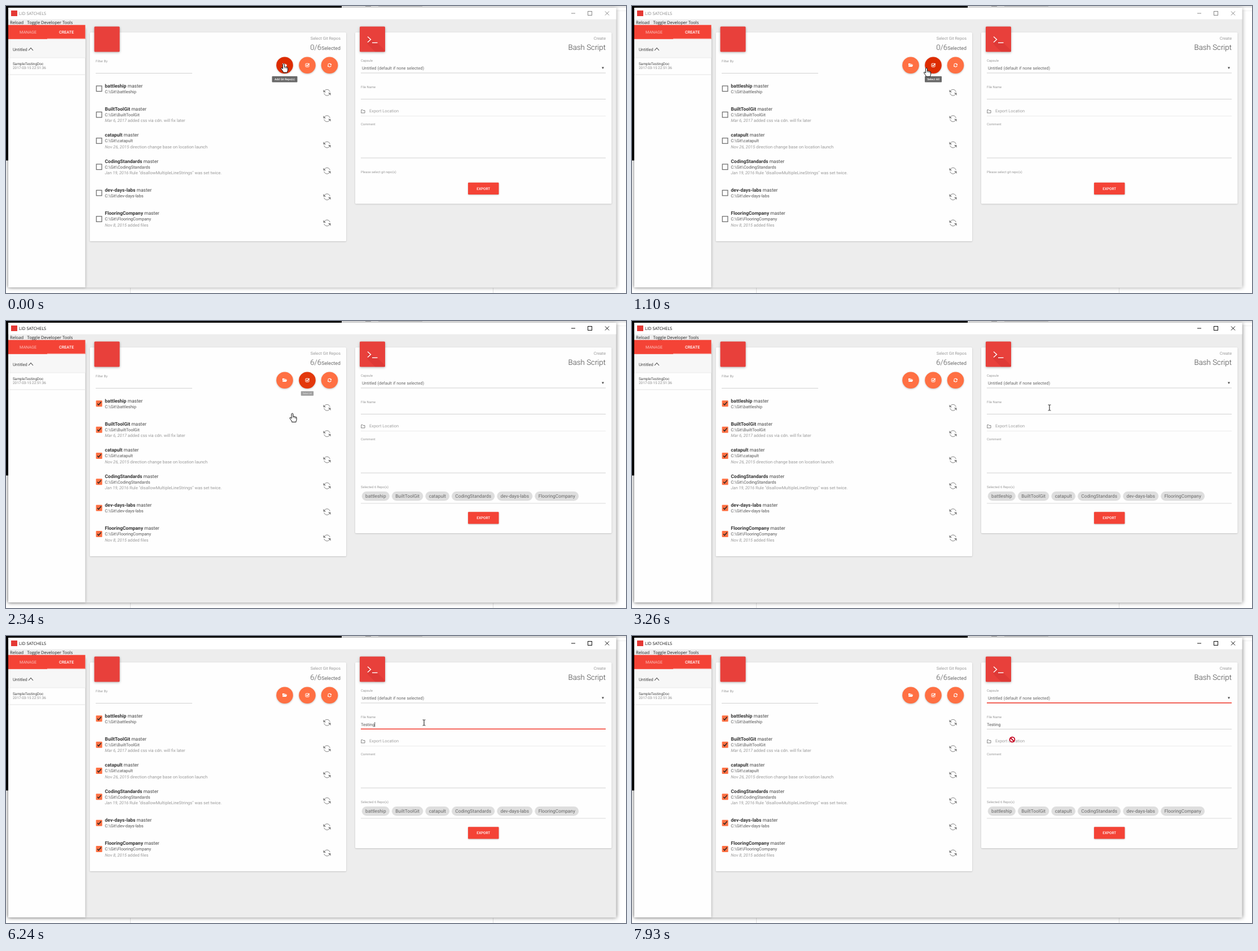
These frames come from a looping animation (1099 by 510 pixels, 8 s). An HTML page with a canvas:

```html
<!DOCTYPE html>
<html lang="en">
<head>
<meta charset="utf-8">
<title>Repository bundle tool</title>
<style>
html, body { margin: 0; width: 100%; height: 100%; overflow: hidden; background: #fff; }
canvas { display: block; width: 1099px; height: 510px; }
</style>
</head>
<body>
<canvas id="stage" width="1099" height="510"></canvas>
<script>
const LOOP = 8000;
const RED = '#f44336', ORANGE = '#ff7043';
const ROBOTO = 'Roboto, sans-serif', SYSTEM = '"Open Sans", sans-serif';
const ctx = document.getElementById('stage').getContext('2d');

const repos = [
  { name: 'battleship' },
  { name: 'BuiltToolGit', date: 'Mar 6, 2017', note: ' added css via cdn. will fix later' },
  { name: 'catapult', date: 'Nov 26, 2015', note: ' direction change base on location launch' },
  { name: 'CodingStandards', date: 'Jan 19, 2016', note: ' Rule "disallowMultipleLineStrings" was set twice.' },
  { name: 'dev-days-labs' },
  { name: 'FlooringCompany', date: 'Nov 8, 2015', note: ' added files' }
];

// time, x, y, pointer kind; each pose holds until the next
const pointerPath = [
  [0, 492, 102.5, 'hand'], [150, 491.5, 102, 'hand'], [310, 492, 103, 'hand'],
  [610, 500, 104, 'hand'], [770, 510, 107, 'arrow'], [930, 519, 110, 'hand'], [1100, 522, 110, 'hand'],
  [1390, 524, 109.5, 'hand'], [1540, 525, 110, 'hand'],
  [2010, 524, 113, 'hand'], [2170, 516, 139, 'hand'], [2340, 507.5, 164, 'hand'],
  [2490, 540, 184, 'hand'], [2640, 588, 201, 'hand'], [2790, 634, 207, 'arrow'],
  [2940, 684, 192, 'arrow'], [3100, 725, 161, 'beam'], [3260, 740, 154, 'beam'],
  [5740, 741, 159, 'beam'], [5900, 742, 172, 'arrow'], [6050, 742, 168, 'arrow'],
  [6210, 741, 154, 'beam'], [6370, 739, 132, 'arrow'], [6530, 736, 113, 'arrow'], [6680, 734, 106.5, 'arrow'],
  [7620, 721, 128, 'arrow'], [7780, 695, 158, 'beam'], [7930, 674, 184, 'denied']
];
const typing = [[0, ''], [4800, 'Tes'], [4960, 'Test'], [5120, 'Testin'], [5280, 'Testing']];

const handShape = new Path2D('M-1.4 1Q0 -1 1.4 1V5.5Q2.7 4.6 3.7 6Q5 5.2 5.8 6.6Q7.6 6.2 7.6 8V11.5Q7.2 13 6.6 14.2V15.6H-.8V14.2Q-3 11 -4.4 9Q-4.6 7 -3 7.4L-1.4 9.2Z');
const arrowShape = new Path2D('M0 0V10.5L2.4 8.3L4.1 12.2L5.8 11.5L4.1 7.7H7.4Z');

const heldAt = (list, t) => list.filter(k => k[0] <= t).pop();
const clamp01 = v => Math.max(0, Math.min(1, v));
const ramp = (t, from, to) => clamp01((t - from) / (to - from));

function rect(x, y, w, h, fill) {
  ctx.fillStyle = fill;
  ctx.fillRect(x, y, w, h);
}

function line(points, color, width = 1) {
  ctx.beginPath();
  points.forEach(([x, y]) => ctx.lineTo(x, y));
  ctx.strokeStyle = color;
  ctx.lineWidth = width;
  ctx.stroke();
}

function round(x, y, w, h, r, fill) {
  ctx.beginPath();
  ctx.roundRect(x, y, w, h, r);
  ctx.fillStyle = fill;
  ctx.fill();
}

function disc(x, y, r, fill) {
  ctx.beginPath();
  ctx.arc(x, y, r, 0, 7);
  ctx.fillStyle = fill;
  ctx.fill();
}

function shadowed(alpha, blur, dy, draw) {
  ctx.save();
  ctx.shadowColor = `rgba(0,0,0,${alpha})`;
  ctx.shadowBlur = blur;
  ctx.shadowOffsetY = dy;
  draw();
  ctx.restore();
}

// y is the middle of the capitals; returns the x where the text ends
function text(str, x, y, size, color, { style = '', align = 'left', family = ROBOTO } = {}) {
  ctx.font = `${style} ${size}px ${family}`;
  ctx.textAlign = align;
  ctx.fillStyle = color;
  ctx.fillText(str, x, y + size * 0.355);
  return x + ctx.measureText(str).width;
}

// direction 1 turns clockwise, -1 counter-clockwise
function cycleArrows(x, y, r, color, width, direction) {
  ctx.save();
  ctx.translate(x, y);
  ctx.scale(direction, 1);
  for (let i = 0; i < 2; i++) {
    ctx.beginPath();
    ctx.arc(0, 0, r, Math.PI * 1.08, Math.PI * 1.85);
    ctx.strokeStyle = color;
    ctx.lineWidth = width;
    ctx.stroke();
    ctx.beginPath();
    ctx.moveTo(r * 1.2, -r * 0.95);
    ctx.lineTo(r * 1.2, -r * 0.1);
    ctx.lineTo(r * 0.35, -r * 0.1);
    ctx.fillStyle = color;
    ctx.fill();
    ctx.rotate(Math.PI);
  }
  ctx.restore();
}

function drawDesktop() {
  rect(0, 0, 1099, 510, '#fff');
  rect(0, 0, 595, 4, '#000');
  rect(0, 0, 4, 274.5, '#000');
  rect(595, 0, 504, 3, '#e8e8e8');
  rect(637, 0, 10, 1, '#999');
  rect(660, 0, 78, 1, '#bbb');
  rect(1082, 8, 17, 1, '#f0f0f0');
  rect(220, 501, 1, 9, '#e2e2e2');
  rect(863, 501, 1, 9, '#e2e2e2');
}

function drawWindow(focused) {
  shadowed(focused ? 0.5 : 0.38, 7, 1, () => rect(4, 3, 1077.5, 497.3, '#ededed'));
  rect(4, 3, 1077.5, 20.5, '#fff');
  rect(9, 8, 11, 10, '#e53935');
  const ink = focused ? '#111' : '#888';
  text('LID SATCHELS', 23, 13, 7.5, ink, { family: SYSTEM });
  line([[1002, 13], [1009, 13]], ink);
  ctx.strokeRect(1031.5, 9.5, 7, 7);
  line([[1062, 9.5], [1069, 16.5]], ink);
  line([[1069, 9.5], [1062, 16.5]], ink);
  text('Reload', 7, 29.5, 7.55, '#222', { family: SYSTEM });
  text('Toggle Developer Tools', 37.5, 29.5, 7.55, '#222', { family: SYSTEM });
}

function drawSidebar() {
  shadowed(0.28, 4, 0, () => rect(4, 40, 136.5, 460, '#fefefe'));
  rect(4, 33.7, 136.5, 25.2, RED);
  rect(73, 57.7, 67.5, 1.2, '#f9b9b3');
  text('MANAGE', 24, 46, 7.25, '#fbc0bb');
  text('CREATE', 94, 46, 7.25, '#fff', { style: '500' });
  rect(4, 58.9, 136.5, 33, '#f7f7f7');
  rect(4, 91.5, 136.5, 1, '#ebebeb');
  rect(4, 121.5, 136.5, 1, '#e4e4e4');
  text('Untitled', 12, 77, 7.5, '#444');
  line([[40, 79], [44, 74.5], [48, 79]], '#444', 1.1);
  text('SampleTestingDoc', 12, 103, 6.5, '#444');
  text('2017-03-15 22:51:36', 12, 110, 6.45, '#888');
}

function card(x, bottom) {
  shadowed(0.2, 2.5, 0.7, () => round(x, 47, 454.5, bottom - 47, 1.5, '#fefefe'));
}

function tile(x) {
  shadowed(0.28, 4, 1.2, () => round(x, 36.5, 45, 45, 1.5, '#e8403b'));
}

function terminalTile(x) {
  tile(x);
  ctx.save();
  ctx.beginPath();
  ctx.rect(x, 36.5, 45, 45);
  ctx.clip();
  ctx.beginPath();
  [[14, 17], [20, 23], [32, 29], [48, 45], [48, 60], [43, 60], [14, 31]].forEach(([a, b]) => ctx.lineTo(x + a, 37 + b));
  ctx.fillStyle = 'rgba(170,20,25,.16)';
  ctx.fill();
  ctx.restore();
  line([[x + 14, 54.5], [x + 19.5, 59.5], [x + 14, 64.5]], '#fff', 1.4);
  line([[x + 22, 65.3], [x + 31.5, 65.3]], '#fff', 1.4);
}

function mixHover(amount) {
  const a = [255, 112, 67], b = [221, 44, 0];
  return `rgb(${a.map((v, i) => Math.round(v + (b[i] - v) * amount))})`;
}

function roundButton(x, hover) {
  shadowed(0.24, 3, 1, () => disc(x, 105.2, 14.8, mixHover(hover)));
}

function folderIcon(x, y) {
  ctx.beginPath();
  [[-4, 3], [-4, -3], [-1, -3], [0, -2], [2.6, -2], [2.6, -0.6], [4.3, -0.6], [2.7, 3]].forEach(([a, b]) => ctx.lineTo(x + a, y + b));
  ctx.fillStyle = '#fff';
  ctx.fill();
  line([[x - 3.6, y + 2.2], [x - 2.2, y - 0.6], [x + 2.6, y - 0.6]], ORANGE, 0.6);
}

function drawButtons(t) {
  const addHover = t < 770 ? 1 : 0;
  const allHover = t < 930 ? 0 : t < 2170 ? 1 : 1 - ramp(t, 2240, 2790);
  roundButton(494, addHover);
  roundButton(534, allHover);
  roundButton(573.5, 0);
  folderIcon(494, 105);
  ctx.beginPath();
  ctx.roundRect(531, 102.2, 6, 6, 1);
  ctx.strokeStyle = '#fff';
  ctx.lineWidth = 1;
  ctx.stroke();
  line([[532.3, 104.6], [533.8, 106.2], [537.8, 102.2]], '#fff', 1.3);
  cycleArrows(573.5, 105.2, 2.9, '#fff', 1.2, 1);
}

function tooltip(str, x, width, alpha, scale) {
  if (alpha <= 0) return;
  ctx.save();
  ctx.globalAlpha = alpha;
  ctx.translate(x, 124.7);
  ctx.scale(scale, scale);
  round(-width / 2, 0, width, 10.7, 1, '#686868');
  text(str, 0, 5.2, 5.1, '#fff', { style: '500', align: 'center' });
  ctx.restore();
}

function drawTooltips(t) {
  tooltip('Add Git Repo(s)', 494, 45, t < 770 ? 1 : t < 930 ? 0.5 : 0, 1);
  const shown = t < 930 ? 0 : t < 1100 ? 0.6 : 1;
  const leaving = ramp(t, 2170, 2640);
  tooltip('Select All', 534, 30, shown * (1 - leaving), 1 - 0.7 * leaving);
}

function checkBox(x, y, checked) {
  if (checked) {
    round(x - 5.5, y - 5.5, 11, 11, 1, ORANGE);
    line([[x - 3, y], [x - 0.9, y + 2.4], [x + 3.6, y - 3]], '#222', 1.4);
  } else {
    ctx.strokeStyle = '#666';
    ctx.lineWidth = 1.2;
    ctx.strokeRect(x - 4.8, y - 4.8, 9.6, 9.6);
  }
}

function drawRepoCard(t, selected) {
  card(148.5, 418);
  tile(156.5);
  text('Select Git Repos', 593, 57.5, 7.3, '#999', { align: 'right' });
  text('Selected', 593, 74.5, 8.8, '#666', { align: 'right' });
  text(selected ? '6/6' : '0/6', 559, 73.5, 13.2, '#555', { style: '300', align: 'right' });
  text('Filter By', 159, 98, 5.85, '#999');
  rect(159, 119, 171, 1, '#d2d2d2');
  repos.forEach((repo, i) => {
    const y = 146.8 + i * 46.35;
    const titleY = y - (repo.note ? 10.3 : 4.8);
    checkBox(165, y, selected);
    const end = text(repo.name, 175.3, titleY, 8.5, '#333', { style: 'bold' });
    text(' master', end, titleY, 8.5, '#444');
    text('C:\\Git\\' + repo.name, 175.3, titleY + 10.4, 7.55, '#555');
    if (repo.note) {
      const noteX = text(repo.date, 175.3, titleY + 20.8, 7.55, '#999', { style: 'italic' });
      text(repo.note, noteX, titleY + 20.8, 7.55, '#999');
    }
    cycleArrows(569, y + 7, 5.4, '#808080', 1, -1);
  });
  drawButtons(t);
  drawTooltips(t);
}

function underline(y, redness, color = '#d2d2d2') {
  rect(629, y, 434, 1, color);
  if (redness > 0) {
    ctx.globalAlpha = redness;
    rect(629, y - 0.5, 434, 1.6, RED);
    ctx.globalAlpha = 1;
  }
}

function drawChips() {
  let x = 630.7;
  for (const { name } of repos) {
    ctx.font = `8.3px ${ROBOTO}`;
    const width = ctx.measureText(name).width + 12.6;
    round(x, 303, width, 16.5, 8.25, '#dedede');
    text(name, x + 6.3, 311, 8.3, '#666');
    x += width + 4;
  }
  rect(629, 323.5, 434, 1, '#dcdcdc');
}

function caretVisible(t) {
  if (t < 3400 || t >= 6840) return false;
  if (t < 4800) return t < 3860 || t >= 4490;
  return t < 5740 || t >= 6210;
}

function drawScriptCard(t, selected) {
  const bottom = selected ? 377 : 351.5;
  card(619, bottom);
  terminalTile(627);
  text('Create', 1063, 57.5, 7.3, '#999', { align: 'right' });
  text('Bash Script', 1063, 73.5, 13.3, '#444', { style: '300', align: 'right' });

  text('Capsule', 629, 97, 5.85, '#999');
  text('Untitled (default if none selected)', 631, 110, 7.45, '#666');
  ctx.beginPath();
  [[1056, 108.5], [1060, 108.5], [1058, 112]].forEach(p => ctx.lineTo(...p));
  ctx.fillStyle = '#444';
  ctx.fill();
  underline(118.5, t >= 7320 ? 1 : t >= 7160 ? 0.6 : 0);

  text('File Name', 629, 144, 5.85, '#999');
  const fileName = heldAt(typing, t)[1];
  const end = text(fileName, 629, 157, 7.45, '#555');
  if (caretVisible(t)) rect(end, 153, 0.8, 8.5, '#333');
  underline(165, t < 6840 ? ramp(t, 3400, 3860) : 0);

  line([[629.8, 190], [629.8, 184.5], [632, 184.5], [633, 185.6], [636, 185.6], [636, 190], [629.4, 190]], '#777', 0.9);
  text('Export Location', 644, 186, 7.45, '#a0a0a0');
  underline(195, 0, '#ebebeb');
  text('Comment', 629, 210, 5.85, '#999');
  underline(269.5, 0);

  text(selected ? 'Selected 6 Repo(s)' : 'Please select git repo(s)', 629, 295.3, 5.85, '#999');
  if (selected) drawChips();
  const buttonY = bottom - 37.7;
  shadowed(0.25, 2.5, 0.7, () => round(819, buttonY, 54.5, 21.2, 1.2, RED));
  text('EXPORT', 846.2, buttonY + 10.5, 6.4, '#fff', { style: '500', align: 'center' });

  if (t >= 6840 && t < 7160) {
    rect(629, 118.5, 434, 11.5, '#8a8a8a');
    rect(629.5, 119, 433, 10.5, '#1e90ff');
    text('Untitled (default if none selected)', 631.5, 124.2, 7.45, '#fff');
  }
}

function drawPointer(t) {
  const [, x, y, kind] = heldAt(pointerPath, t);
  ctx.save();
  ctx.translate(x, y);
  if (kind === 'beam') {
    line([[-2.5, -5], [-0.6, -5], [0, -4.4], [0.6, -5], [2.5, -5]], '#222', 0.9);
    line([[0, -5], [0, 5]], '#222', 1.1);
    line([[-2.5, 5], [-0.6, 5], [0, 4.4], [0.6, 5], [2.5, 5]], '#222', 0.9);
  } else if (kind === 'denied') {
    disc(0, 0, 5.6, '#fff');
    ctx.beginPath();
    ctx.arc(0, 0, 4.4, 0, 7);
    ctx.strokeStyle = '#c4001d';
    ctx.lineWidth = 1.8;
    ctx.stroke();
    line([[-3, -3], [3, 3]], '#c4001d', 1.8);
  } else {
    const shape = kind === 'hand' ? handShape : arrowShape;
    ctx.fillStyle = '#fff';
    ctx.strokeStyle = '#111';
    ctx.lineWidth = 1;
    ctx.fill(shape);
    ctx.stroke(shape);
    if (kind === 'hand') {
      for (const [px, top] of [[1.4, 5.5], [3.7, 6], [5.8, 6.8]]) line([[px, top], [px, top + 2.6]], '#111', 0.7);
    }
  }
  ctx.restore();
}

function render(t) {
  const selected = t >= 2010;
  drawDesktop();
  drawWindow(t >= 1860);
  drawSidebar();
  drawRepoCard(t, selected);
  drawScriptCard(t, selected);
  drawPointer(t);
}

ctx.textRendering = 'geometricPrecision';
const start = performance.now();
function tick() {
  render((performance.now() - start) % LOOP);
  requestAnimationFrame(tick);
}
tick();
</script>
</body>
</html>
```
